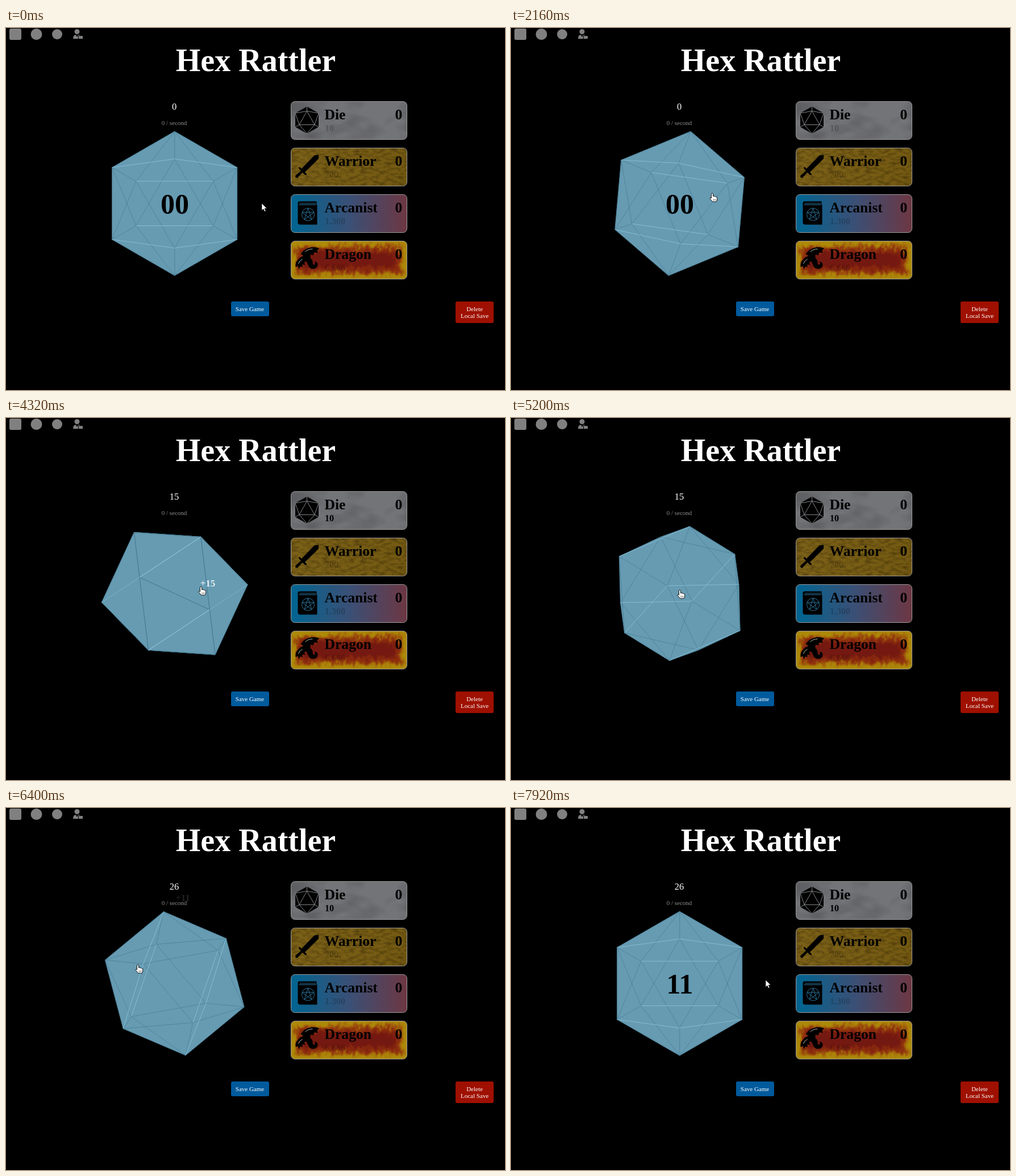
These frames come from a looping animation (878x638 px, 8 s). An HTML page:

```html
<!DOCTYPE html>
<html lang="en">
<head>
<meta charset="utf-8">
<title>Hex Rattler</title>
<style>
  html, body { margin: 0; width: 100%; height: 100%; overflow: hidden; background: #000; }
  svg { display: block; width: 878px; height: 638px; }
  text { font-family: "Liberation Serif", "Times New Roman", serif; }
  .mid { text-anchor: middle; }
  .bold { font-weight: bold; }
  .small { font-size: 11px; fill: #fff; text-anchor: middle; }
  .name { font-size: 25.6px; font-weight: bold; }
  .cost { font-size: 16px; font-weight: bold; fill-opacity: .2; }
  .cost.open { fill-opacity: 1; }
  .frame { fill: none; stroke: #9b9b9b; }
</style>
</head>
<body>
<svg viewBox="0 0 878 638">
  <defs>
    <filter id="cloud" color-interpolation-filters="sRGB">
      <feTurbulence type="fractalNoise" baseFrequency=".015 .03" numOctaves="3" seed="4"/>
      <feColorMatrix values="0 0 0 0 0  0 0 0 0 0  0 0 0 0 0  .5 0 0 0 -.2"/>
      <feComposite operator="in" in2="SourceGraphic" result="shade"/>
      <feMerge><feMergeNode in="SourceGraphic"/><feMergeNode in="shade"/></feMerge>
    </filter>
    <filter id="grain" color-interpolation-filters="sRGB">
      <feTurbulence type="fractalNoise" baseFrequency=".09 .2" numOctaves="3" seed="7"/>
      <feColorMatrix values="0 0 0 0 .12  0 0 0 0 .08  0 0 0 0 0  .9 0 0 0 -.36"/>
      <feComposite operator="in" in2="SourceGraphic" result="shade"/>
      <feMerge><feMergeNode in="SourceGraphic"/><feMergeNode in="shade"/></feMerge>
    </filter>
    <filter id="flame" x="-10%" y="-30%" width="120%" height="160%" color-interpolation-filters="sRGB">
      <feTurbulence type="fractalNoise" baseFrequency=".13 .08" numOctaves="3" seed="3" result="noise"/>
      <feGaussianBlur in="SourceGraphic" stdDeviation="2.6"/>
      <feDisplacementMap in2="noise" scale="18" xChannelSelector="R" yChannelSelector="G"/>
    </filter>
    <linearGradient id="gold"><stop stop-color="#7c6118"/><stop offset="1" stop-color="#745a12"/></linearGradient>
    <linearGradient id="arcane">
      <stop stop-color="#006592"/><stop offset=".5" stop-color="#3a5076"/><stop offset="1" stop-color="#6d3743"/>
    </linearGradient>
    <clipPath id="cardClip"><rect width="204" height="67" rx="7"/></clipPath>
  </defs>
  <rect width="878" height="638"/>

  <g fill="#808080">
    <rect x="6" y="1" width="21" height="20" rx="3"/>
    <circle cx="53.5" cy="11" r="10"/>
    <circle cx="90" cy="11" r="9"/>
    <circle cx="125" cy="6.5" r="4.5"/>
    <path d="M118 19q0-7 5-7l2 4 2-4q3 0 4 1h-4v6z"/>
    <path d="M128 14h7v5h-7z"/>
  </g>

  <text class="mid bold" x="439.5" y="76" font-size="56" fill="#fff">Hex Rattler</text>
  <text id="score" class="mid" x="296" y="144" font-size="16.5" fill="#fff">0</text>
  <text class="mid" x="296" y="171" font-size="11" fill="#8c8c8c">0 / second</text>

  <g transform="translate(501.5 129.5)">
    <g clip-path="url(#cardClip)"><rect width="204" height="67" fill="#737478" filter="url(#cloud)"/></g>
    <rect class="frame" width="204" height="67" rx="7"/>
    <path d="M28 9 48.5 20.5V45L28 56.5 7.5 45V20.5z"/>
    <path d="M28 9v8M7.5 20.5 28 17l20.5 3.5M28 17 14.5 41h27zM14.5 41l-7-20.5M41.5 41l7-20.5M7.5 45l7-4L28 56.5 41.5 41l7 4" fill="none" stroke="#85868a"/>
    <text class="name" x="59" y="31.5">Die</text>
    <text id="firstCost" class="cost" x="59.5" y="52.5">10</text>
    <text class="name" x="183" y="31.5">0</text>
  </g>

  <g transform="translate(501.5 211.5)">
    <g clip-path="url(#cardClip)"><rect width="204" height="67" fill="url(#gold)" filter="url(#grain)"/></g>
    <rect class="frame" width="204" height="67" rx="7"/>
    <path d="M48.5 12v7L24 43l-6-6L41 13zM14 33l2 1 11 11 1 3-4-1-4-4-9 10-3-1-.5-3 10-9-4-4z"/>
    <text class="name" x="59" y="31.5">Warrior</text>
    <text class="cost" x="59.5" y="52">200</text>
    <text class="name" x="183" y="31.5">0</text>
  </g>

  <g transform="translate(501.5 293.5)">
    <rect width="204" height="67" rx="7" fill="url(#arcane)"/>
    <rect class="frame" width="204" height="67" rx="7"/>
    <path d="M15 12H45V18H46V53H16q-4 0-4-4V15q0-3 3-3z"/>
    <g fill="none" stroke="#2a7299">
      <path d="M15 15.5H44M14 18H44"/>
      <circle cx="30" cy="35" r="11"/>
      <path d="m30 24 6.5 20-17-12.5h21L23.5 44z"/>
    </g>
    <text class="name" x="59" y="31.5">Arcanist</text>
    <text class="cost" x="59.5" y="52">1.300</text>
    <text class="name" x="183" y="31.5">0</text>
  </g>

  <g transform="translate(501.5 375.5)">
    <g clip-path="url(#cardClip)">
      <rect width="204" height="67" fill="#741911"/>
      <g fill="none" filter="url(#flame)">
        <rect width="204" height="67" rx="14" stroke="#8c2c0e" stroke-width="40"/>
        <rect width="204" height="67" rx="8" stroke="#a56a08" stroke-width="23"/>
        <rect width="204" height="67" rx="8" stroke="#ad8a08" stroke-width="13"/>
      </g>
    </g>
    <rect class="frame" width="204" height="67" rx="7"/>
    <path d="M17 23q7-11 19-12 8-1 14 2l-4 3 1 5-6-1-2 5-5-1 0 6q5 4 4 9 1 4 4 2 1-2-1-4 5-1 6 4 0 6-6 8-9 1-11-7l-3-6-4 1 2 5-5-1 0 5-4-1-2 5-2-6-4 2q-1-9 5-14 3-4 9-6z"/>
    <path d="M25 19q5-5 13-5M13 40q1-5 7-8" fill="none" stroke="#b8b2a2"/>
    <text class="name" x="59" y="31.5">Dragon</text>
    <text class="cost" x="59.5" y="52">6.666</text>
    <text class="name" x="183" y="31.5">0</text>
  </g>

  <rect x="396" y="482" width="67" height="26" rx="3" fill="#005a9c"/>
  <text class="small" x="429" y="498.5">Save Game</text>
  <rect x="791" y="482" width="67" height="38" rx="3" fill="#9f1000"/>
  <text class="small" x="824.5" y="498.5">Delete</text>
  <text class="small" x="824.5" y="510.5">Local Save</text>

  <path id="body" fill="#669bb2" stroke="#669bb2" stroke-width=".6" stroke-linejoin="round"/>
  <path id="darkEdges" fill="none" stroke="#2f6078" stroke-opacity=".4" stroke-width=".9"/>
  <path id="lightEdges" fill="none" stroke="#92c8df" stroke-opacity=".75"/>
  <text id="face" class="mid bold" x="297" y="327" font-size="50">00</text>
  <text id="gain" class="mid bold" font-size="17" fill="#fff"></text>

  <g id="arrow"><path d="M0 0V12.5L3 10l2 4.5 2-1L5 9h4z" fill="#fff" stroke="#000" stroke-width=".6"/></g>
  <g id="hand" fill="#fff" stroke="#000" stroke-width=".9">
    <path d="M-1.5 1q1.500-2 3 0V5.500q2-1 2.500.500 2-.800 2.500.700 2.200-.500 2.200 1.500V11q0 2-1.500 4H.500Q-2 12-4.500 9q.500-2 3 0z"/>
    <path d="M2 10.5v2.500M4 10.5v2.500M6 10.5v2.500" stroke-width=".6"/>
  </g>
</svg>

<script>
const LOOP = 8000, STEP = 80, RADIUS = 129.3, CX = 296.7, CY = 309.3, RAD = Math.PI / 180;
const FLOAT_TIME = 1000, FLOAT_RISE = 160, SETTLED = 7000;
const $ = id => document.getElementById(id);

// Icosahedron seen along a three-fold axis: inner front, inner back, then the outer ring.
const ring = (radius, start, z) => [0, 120, 240].map(a =>
  [radius * Math.cos((start + a) * RAD), radius * Math.sin((start + a) * RAD), z]);
const vertices = [
  ...ring(.607, -90, .795),   // 0 up, 1 right, 2 left
  ...ring(.607, 90, -.795),   // 3 down, 4 left, 5 right
  ...ring(.982, -90, -.188),  // 6 up, 7 lower right, 8 lower left
  ...ring(.982, 90, .188)     // 9 down, 10 upper left, 11 upper right
];
const touch = (i, j) => vertices[i].reduce((sum, v, k) => sum + v * vertices[j][k], 0) > .3;
const edges = [], faces = [];
for (let i = 0; i < 12; i++)
  for (let j = i + 1; j < 12; j++) if (touch(i, j)) {
    edges.push([i, j]);
    for (let k = j + 1; k < 12; k++) if (touch(i, k) && touch(j, k)) faces.push([i, j, k]);
  }
const lit = new Set(['0-10', '0-11', '1-2', '3-7', '3-8', '4-5']);

// time, then angles applied in the order z, x, z, x, y
const poses = [
  [0, 0, 0, 0, 0, 0], [80, 0, 0, 0, 0, 0], [540, 0, 0, 6, -3, -5], [1120, 0, 0, 0, 0, 0],
  [1280, 0, 0, 0, 0, 0], [2160, 0, 0, 8, -3.6, -6.7], [3440, 0, 0, 0, 0, 0],
  [3600, 0, 0, 0, 0, 0], [4160, 0, 0, 3, -2, -3], [4320, 120, 20.9, 24.8, 0, 0],
  [5200, 360, -37.4, 157, 6, -9.6], [6400, 840, 0, 350, -4.5, -10],
  [SETTLED, 1080, 0, 360, 0, 0], [7400, 1080, 0, 365, -2, -4], [7840, 1080, 0, 360, 0, 0]
];
// time, then pointer tip
const pointer = [
  [0, 450, 309], [540, 372, 300], [1120, 450, 309], [1280, 450, 309], [1760, 362, 296],
  [2160, 354, 291], [2960, 398, 304], [3440, 453, 309], [3600, 453, 309], [4160, 345, 306],
  [4320, 343, 297], [5200, 297, 303], [5520, 298, 303], [6400, 232, 276], [7120, 300, 288],
  [7840, 448, 303]
];
const rolls = [{ at: 4160, value: 15, x: 355, y: 317 }, { at: 5520, value: 11, x: 311, y: 299 }];

// Cubic interpolation that comes to rest at each turning point.
function sample(keys, t) {
  const i = keys.findIndex(k => k[0] > t) - 1;
  if (i < 0) return keys[keys.length - 1].slice(1);
  const slope = (n, c) => {
    const a = keys[n - 1], b = keys[n], d = keys[n + 1];
    return a && d && (b[c] - a[c]) * (d[c] - b[c]) > 0 ? (d[c] - a[c]) / (d[0] - a[0]) : 0;
  };
  const a = keys[i], b = keys[i + 1], span = b[0] - a[0], u = (t - a[0]) / span, v = 1 - u;
  return a.slice(1).map((p, n) => {
    const c = n + 1;
    return v * v * (1 + 2 * u) * p + u * u * (3 - 2 * u) * b[c]
      + span * u * v * (v * slope(i, c) - u * slope(i + 1, c));
  });
}

function turn(p, axis, degrees) {
  const a = (axis + 1) % 3, b = (axis + 2) % 3, s = Math.sin(degrees * RAD), c = Math.cos(degrees * RAD);
  const out = p.slice();
  out[a] = p[a] * c - p[b] * s;
  out[b] = p[a] * s + p[b] * c;
  return out;
}

function drawDie(t) {
  const angles = sample(poses, t), axes = [2, 0, 2, 0, 1];
  const points = vertices.map(v => {
    const p = axes.reduce((q, axis, n) => turn(q, axis, angles[n]), v);
    return [CX + RADIUS * p[0], CY + RADIUS * p[1]];
  });
  const line = ids => 'M' + ids.map(i => points[i].map(n => n.toFixed(2))).join('L');
  const clockwise = ([i, j, k]) => {
    const [a, b, c] = [points[i], points[j], points[k]];
    return (b[0] - a[0]) * (c[1] - a[1]) > (b[1] - a[1]) * (c[0] - a[0]) ? [i, j, k] : [i, k, j];
  };
  const isLit = e => lit.has(e.join('-'));
  $('body').setAttribute('d', faces.map(f => line(clockwise(f)) + 'z').join(''));
  $('darkEdges').setAttribute('d', edges.filter(e => !isLit(e)).map(line).join(''));
  $('lightEdges').setAttribute('d', edges.filter(isLit).map(line).join(''));
}

function drawTexts(t) {
  const done = rolls.filter(r => t >= r.at), last = done[done.length - 1];
  const score = done.reduce((sum, r) => sum + r.value, 0);
  $('score').textContent = score;
  $('firstCost').classList.toggle('open', score >= 10);
  $('face').textContent = !last ? '00' : t >= SETTLED ? last.value : '';
  const p = last ? Math.min(1, (t - last.at) / FLOAT_TIME) : 1;
  $('gain').setAttribute('opacity', 1 - p);
  if (last) {
    $('gain').textContent = '+' + last.value;
    $('gain').setAttribute('x', last.x);
    $('gain').setAttribute('y', last.y + 6 - FLOAT_RISE * p);
  }
}

function drawPointer(t) {
  const [x, y] = sample(pointer, t), over = x < 408;
  for (const [id, shown] of [['hand', over], ['arrow', !over]]) {
    $(id).setAttribute('transform', `translate(${x} ${y})`);
    $(id).setAttribute('visibility', shown ? 'visible' : 'hidden');
  }
}

const start = performance.now();
function draw() {
  const t = Math.floor((performance.now() - start) % LOOP / STEP) * STEP;
  drawDie(t);
  drawTexts(t);
  drawPointer(t);
  requestAnimationFrame(draw);
}
draw();
</script>
</body>
</html>
```
